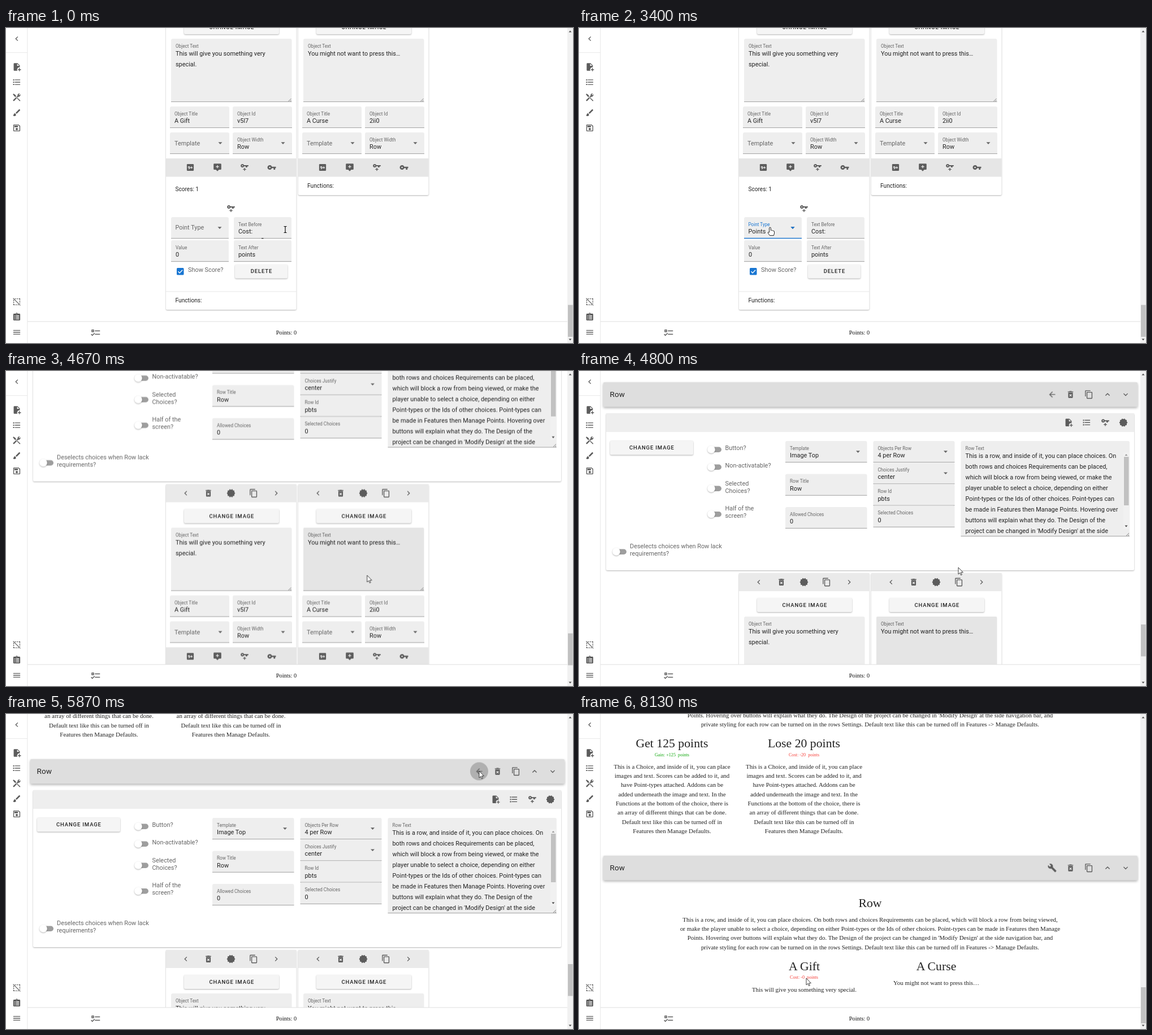
These frames come from a looping animation (1003x558 px, 8.99 s). An HTML page:

```html
<!DOCTYPE html>
<html lang="en">
<head>
<meta charset="utf-8">
<title>Choice editor</title>
<style>
@property --dy { syntax: '<number>'; inherits: true; initial-value: -416; }
html, body { margin: 0; width: 100%; height: 100%; overflow: hidden; background: #fff; }
svg { display: block; width: 1003px; height: 558px; font-family: Roboto, sans-serif; animation: scroll 8990ms linear infinite; }
text { white-space: pre; }
.serif { font-family: "Liberation Serif", "Times New Roman", serif; }
.card { filter: drop-shadow(0 1px 1px rgba(0,0,0,.3)); }
.bar { filter: drop-shadow(0 2px 2px rgba(0,0,0,.3)); }
.menu { filter: drop-shadow(0 2px 3px rgba(0,0,0,.35)); }
#page { transform: translateY(calc(var(--dy) * 1px)); }
#thumb { transform: translateY(calc(var(--dy) * -.1px)); }
.line { transform-box: fill-box; transform-origin: center; }
.edit, .view, .hover, .value, .beam, .hand, .arrow, .over, .ripple, .picked, .menu, .line, .label, .mark, .brush, #cursor {
  animation: 8990ms linear infinite;
}
.edit { animation-name: edit; animation-timing-function: step-end; }
.view { animation-name: view; animation-timing-function: step-end; }
.hover { animation-name: hover; }
.value { animation-name: value; animation-timing-function: step-end; }
.beam { animation-name: beam; animation-timing-function: step-end; }
.hand { animation-name: hand; animation-timing-function: step-end; }
.arrow { animation-name: arrow; animation-timing-function: step-end; }
.over { animation-name: over; }
.ripple { animation-name: ripple; transform-box: fill-box; transform-origin: center; }
.picked { animation-name: picked; }
.menu { animation-name: menu; }
.line { animation-name: line; }
.label { animation-name: label; }
.mark { animation-name: mark; }
.brush { animation-name: brush; }
#cursor { animation-name: move; animation-timing-function: ease-in-out; }

@keyframes scroll {
  0%, 48.93% { --dy: -416; }
  48.94%, 50.38% { --dy: -395; }
  50.39% { --dy: -330; }
  53.39%, 54.17% { --dy: 0; }
  58%, 65.95% { --dy: 60; }
  65.96%, 100% { --dy: 231; }
}
@keyframes move {
  0%, 10.34% { transform: translate(494px, 357px); }
  17.8% { transform: translate(359px, 356px); }
  20.02%, 29.7% { transform: translate(353px, 355px); }
  31.92%, 40.04% { transform: translate(338px, 353px); }
  48.16%, 50.39% { transform: translate(601px, 378px); }
  53.39%, 54.17% { transform: translate(671px, 348px); }
  60.07%, 60.85% { transform: translate(830px, 125px); }
  63.4%, 65.96% { transform: translate(837px, 101px); }
  70.41%, 71.19% { transform: translate(516px, 290px); }
  79.31%, 100% { transform: translate(402px, 468px); }
}
@keyframes edit { 0% { opacity: 1; } 65.95%, 100% { opacity: 0; } }
@keyframes view { 0% { opacity: 0; } 65.95%, 100% { opacity: 1; } }
@keyframes beam { 0% { opacity: 1; } 14.79% { opacity: 0; } 42.7% { opacity: 1; } 51%, 100% { opacity: 0; } }
@keyframes hand { 0% { opacity: 0; } 14.79% { opacity: 1; } 42.7%, 100% { opacity: 0; } }
@keyframes arrow { 0% { opacity: 0; } 51%, 100% { opacity: 1; } }
@keyframes hover { 0%, 14.79% { opacity: 0; } 17%, 21.1% { opacity: 1; } 22.5%, 100% { opacity: 0; } }
@keyframes value { 0% { opacity: 0; } 34.9%, 100% { opacity: 1; } }
@keyframes mark { 0%, .78% { opacity: 1; } 1.45%, 100% { opacity: 0; } }
@keyframes line { 0%, 21.1% { transform: scaleX(0); } 24.4%, 100% { transform: scaleX(1); } }
@keyframes label {
  0%, 21.1% { transform: translate(299.5px, 357.5px) scale(1.333); fill: #666; }
  23%, 100% { transform: translate(299.5px, 350.7px) scale(1); fill: #1976d2; }
}
@keyframes menu { 0%, 21.5% { opacity: 0; } 24.5%, 34.82% { opacity: 1; } 37.1%, 100% { opacity: 0; } }
@keyframes brush { 0%, 50.4% { opacity: 0; } 51.5%, 53.8% { opacity: 1; } 56%, 100% { opacity: 0; } }
@keyframes over { 0%, 62.4% { opacity: 0; } 63.4%, 65.95% { opacity: .1; } 65.96%, 100% { opacity: 0; } }
@keyframes ripple {
  0%, 64% { opacity: 0; transform: scale(.3); }
  65.2%, 65.95% { opacity: .12; transform: scale(1); }
  65.96%, 100% { opacity: 0; }
}
@keyframes picked { 0%, 82.31% { opacity: 0; } 84.5%, 89.77% { opacity: 1; } 90.43%, 100% { opacity: 0; } }
</style>
</head>
<body>
<svg id="stage" viewBox="0 0 1003 558"></svg>
<script>
const Z = 0.68, BODY = 16 * Z, SMALL = 12 * Z, INK = '#222', SOFT = '#666';

const icons = {
  left: 'M15.4 16.6L10.8 12L15.4 7.4L14 6L8 12L14 18Z',
  right: 'M8.6 16.6L13.2 12L8.6 7.4L10 6L16 12L10 18Z',
  up: 'M7.4 15.4L12 10.8L16.6 15.4L18 14L12 8L6 14Z',
  down: 'M7.4 8.6L12 13.2L16.6 8.6L18 10L12 16L6 10Z',
  back: 'M20 11V13H8L13.5 18.5L12.1 19.9L4.2 12L12.1 4.1L13.5 5.5L8 11Z',
  copy: 'M19 21H8V7H19M19 5H8A2 2 0 0 0 6 7V21A2 2 0 0 0 8 23H19A2 2 0 0 0 21 21V7A2 2 0 0 0 19 5M16 1H4A2 2 0 0 0 2 3V17H4V3H16Z',
  trash: 'M6 19A2 2 0 0 0 8 21H16A2 2 0 0 0 18 19V7H6ZM8.5 11.9L9.9 10.5L12 12.6L14.1 10.5L15.5 11.9L13.4 14L15.5 16.1L14.1 17.5L12 15.4L9.9 17.5L8.5 16.1L10.6 14ZM15.5 4L14.5 3H9.5L8.5 4H5V6H19V4Z',
  badge: 'M23 12L20.6 9.2L20.9 5.5L17.3 4.7L15.4 1.5L12 3L8.6 1.5L6.7 4.7L3.1 5.5L3.4 9.2L1 12L3.4 14.8L3.1 18.5L6.7 19.3L8.6 22.5L12 21L15.4 22.5L17.3 19.3L20.9 18.5L20.6 14.8Z',
  keyPlus: 'M6.5 3C8.5 3 10.1 4.3 10.7 6H22V9H19V12H15V9H10.7A4.5 4.5 0 1 1 6.5 3M6.5 6A1.5 1.5 0 0 0 6.5 9A1.5 1.5 0 0 0 6.5 6M8 16H11V13H13V16H16V18H13V21H11V18H8Z',
  key: 'M7 14A2 2 0 1 1 7 10A2 2 0 0 1 7 14M12.6 10A6 6 0 1 0 12.6 14H17V18H21V14H23V10Z',
  note: 'M4 2H20A2 2 0 0 1 22 4V16A2 2 0 0 1 20 18H16L12 22L8 18H4A2 2 0 0 1 2 16V4A2 2 0 0 1 4 2M11 6V9H8V11H11V14H13V11H16V9H13V6Z',
  box: 'M19 3H5A2 2 0 0 0 3 5V19A2 2 0 0 0 5 21H19A2 2 0 0 0 21 19V5A2 2 0 0 0 19 3Z',
  file: 'M14 2H6A2 2 0 0 0 4 4V20A2 2 0 0 0 6 22H13.8A6 6 0 0 1 20 13V8ZM13 9V3.5L18.5 9ZM18 15V18H15V20H18V23H20V20H23V18H20V15Z',
  list: 'M7 5H21V7H7ZM7 11H21V13H7ZM7 17H21V19H7ZM2.5 4.5H5.5V7.5H2.5ZM2.5 10.5H5.5V13.5H2.5ZM2.5 16.5H5.5V19.5H2.5Z',
  tools: 'M2 4L4 2L10 7L9.5 9L21.5 20L20 21.8L8.5 10L6.5 9.8ZM21.5 3.5L18.5 6.5L17 5.2L20 2A5 5 0 0 0 14 8L2 19.5L4.5 22L16 10A5 5 0 0 0 21.5 3.5Z',
  brush: 'M20.7 4.6L19.4 3.3C19 2.9 18.3 2.9 18 3.3L9 12.3L11.8 15L20.7 6C21.1 5.6 21.1 5 20.7 4.6M7 14A3 3 0 0 0 4 17C4 18.3 2.8 19 2 19C2.9 20.2 4.5 21 6 21A4 4 0 0 0 10 17A3 3 0 0 0 7 14Z',
  save: 'M17 3H5A2 2 0 0 0 3 5V19A2 2 0 0 0 5 21H19A2 2 0 0 0 21 19V7ZM19 19H5V5H16.2L19 7.8ZM12 12A3 3 0 1 0 12 18A3 3 0 0 0 12 12M6 6H15V10H6Z',
  deselect: 'M2 3.3L3.3 2L22 20.7L20.7 22ZM7 3H10V5H7ZM12 3H15V5H12ZM17 3H21V7H19V5H17ZM19 9H21V12H19ZM19 14H21V16H19ZM3 7H5V10H3ZM3 12H5V15H3ZM3 17H5V19H7V21H3ZM9 19H12V21H9ZM14 19H17V21H14Z',
  clipboard: 'M19 3H14.8A3 3 0 0 0 9.2 3H5A2 2 0 0 0 3 5V19A2 2 0 0 0 5 21H19A2 2 0 0 0 21 19V5A2 2 0 0 0 19 3M12 3A1 1 0 1 1 12 5A1 1 0 0 1 12 3M6 8H8V10H6ZM10 8H18V10H10ZM6 12H8V14H6ZM10 12H18V14H10ZM6 16H8V18H6ZM10 16H18V18H10Z',
  menu: 'M3 6H21V8H3ZM3 11H21V13H3ZM3 16H21V18H3Z',
  checks: 'M3 5H9V11H3ZM5 7V9H7V7ZM11 7H23V9H11ZM11 15H23V17H11ZM5 20L1.5 16.5L2.9 15.1L5 17.2L9.6 12.6L11 14Z',
  wrench: 'M22.7 19L13.6 9.9C14.5 7.6 14 4.9 12.1 3C10.1 1 7.1 .6 4.7 1.7L9 6L6 9L1.6 4.7C.4 7.1 .9 10.1 2.9 12.1C4.8 14 7.5 14.5 9.8 13.6L18.9 22.7C19.3 23.1 19.9 23.1 20.3 22.7L22.6 20.4C23.1 20 23.1 19.3 22.7 19Z'
};

const rect = (x, y, w, h, fill, more = '') =>
  `<rect x="${x}" y="${y}" width="${w}" height="${h}" fill="${fill}" ${more}/>`;
// y is the middle of the capitals
const text = (x, y, s, size = BODY, fill = INK, more = '') =>
  `<text x="${x}" y="${y + size * 0.33}" font-size="${size}" fill="${fill}" ${more}>${s}</text>`;
const mid = (x, y, s, size = BODY, fill = INK) => text(x, y, s, size, fill, 'text-anchor="middle"');
const icon = (name, x, y, k = Z) =>
  `<path transform="translate(${x - 12 * k} ${y - 12 * k}) scale(${k})" d="${icons[name]}" fill="#5c5c5c" fill-rule="evenodd"/>`;
const iconRow = (names, xs, y) => names.map((n, i) => icon(n, xs[i], y)).join('');
const group = (body, cls = '', shift = 0) => `<g class="${cls}" transform="translate(0 ${shift})">${body}</g>`;
const caret = (x, y, fill = '#666', more = '') => `<path d="M${x - 3.5} ${y - 1.7}h7l-3.5 3.6z" fill="${fill}" ${more}/>`;

function slab(x, y, w, h, fill = '#eee') {
  return `<path d="M${x} ${y + h}V${y + 3}q0-3 3-3h${w - 6}q3 0 3 3V${y + h}z" fill="${fill}"/>` +
    rect(x, y + h - 0.7, w, 0.8, '#8c8c8c');
}
function field(x, y, w, label, value, select) {
  const words = value === '' ? text(x + 8, y + 19, label, BODY, SOFT)
    : text(x + 8, y + 13, label, SMALL, SOFT) + text(x + 8, y + 25.7, value);
  return slab(x, y, w, 38) + words + (select ? caret(x + w - 16, y + 19) : '');
}
function area(x, y, w, h, label, lines) {
  const rx = x + w, by = y + h;
  return slab(x, y, w, h) + text(x + 8, y + 13, label, SMALL, SOFT) +
    lines.map((s, i) => text(x + 8, y + 26 + i * 19, s)).join('') +
    `<path d="M${rx - 6} ${by - 1}l5-5M${rx - 3} ${by - 1}l2-2" stroke="#666" stroke-width=".8"/>`;
}
function button(x, y, w, h, s) {
  return rect(x, y, w, h, '#f5f5f5', 'rx="2.5" class="card"') +
    text(x + w / 2 + 0.4, y + h / 2, s, 14 * Z, INK, 'text-anchor="middle" font-weight="500" letter-spacing=".85"');
}
function toggle(x, y, lines, labelX, labelY) {
  return rect(x, y - 4.5, 19, 9.5, '#9e9e9e', 'rx="4.7"') +
    `<circle class="card" cx="${x + 1}" cy="${y}" r="6.8" fill="#fff"/>` +
    lines.map((s, i) => text(labelX, labelY + i * 13.4, s, BODY, SOFT)).join('');
}

function card(dx, height, words, title, id, rest) {
  const s = n => n + dx;
  return rect(s(283), -58, 230.5, height, '#fff', 'class="card" rx="2"') +
    rect(s(283), -58, 230.5, 32, '#eaeaea') +
    iconRow(['left', 'trash', 'badge', 'copy', 'right'], [318, 358, 398, 438, 478].map(s), -42) +
    button(s(315), -14, 168, 25, 'CHANGE IMAGE') +
    area(s(292), 19, 213.5, 112, 'Object Text', words) +
    field(s(290), 139, 105, 'Object Title', title) +
    field(s(401), 139, 105, 'Object Id', id) +
    field(s(290), 185, 105, 'Template', '', true) +
    field(s(401), 185, 105, 'Object Width', 'Row', true) +
    rect(s(283), 231, 230.5, 32.5, '#e6e6e6') +
    iconRow(['box', 'note', 'keyPlus', 'key'], [326, 374, 422, 470].map(s), 247) +
    text(s(326), 247, '9+', 8, '#fff', 'text-anchor="middle" font-weight="700"') + rest;
}

const pointType = slab(292, 335, 102, 38) +
  `<g class="hover">${rect(292, 335, 102, 38, '#dfdfdf', 'rx="2"')}${rect(292, 372.2, 102, 1, '#222')}</g>` +
  `<text class="label" font-size="${SMALL}">Point Type</text>` +
  caret(378, 354) + caret(378, 354, '#1976d2', 'class="value"') +
  rect(292, 371.8, 102, 1.4, '#1976d2', 'class="line"') +
  `<g class="value">${text(299.5, 360.7, 'Points')}</g>`;

const scores = text(299.5, 285.5, 'Scores: 1', 10.1) + icon('keyPlus', 398, 320) + pointType +
  field(403, 335, 102, 'Text Before', 'Cost:') +
  rect(452, 372, 3.5, 1.2, '#222', 'class="mark"') +
  field(292, 376, 102, 'Value', '0') + field(403, 376, 102, 'Text After', 'points') +
  rect(302, 425, 12.5, 12.5, '#1976d2', 'rx="1.5"') +
  '<path d="M304.5 431.3l2.6 2.6 5-5.2" fill="none" stroke="#fff" stroke-width="1.4"/>' +
  text(322, 428.5, 'Show Score?', BODY, SOFT) + button(405, 419, 93, 24.5, 'DELETE') +
  rect(283, 466.5, 230.5, 0.8, '#e0e0e0') + text(299.5, 483, 'Functions:', 10.2);

const popup = `<g class="menu">${rect(292, 338, 102, 49, '#fff', 'rx="2.5"')}${rect(292, 344, 102, 37, '#f3f3f3')}${text(303, 363, 'Points')}</g>`;

const rowLines = ['This is a row, and inside of it, you can place choices. On', 'both rows and choices Requirements can be placed,',
  'which will block a row from being viewed, or make the', 'player unable to select a choice, depending on either',
  'Point-types or the Ids of other choices. Point-types can', 'be made in Features then Manage Points. Hovering over',
  'buttons will explain what they do. The Design of the', "project can be changed in 'Modify Design' at the side"];

const rowPanel = rect(48, 75, 934, 278, '#fff', 'class="card" rx="2"') + rect(48, 75, 934, 33, '#eee') +
  iconRow(['file', 'list', 'keyPlus', 'badge'], [866, 898, 931, 963], 91.3) +
  button(55, 123.5, 147, 25, 'CHANGE IMAGE') +
  toggle(233, 139, ['Button?'], 258.5, 136) +
  toggle(233, 170, ['Non-activatable?'], 258.5, 167) +
  toggle(233, 208, ['Selected', 'Choices?'], 258.5, 199) +
  toggle(233, 253.5, ['Half of the', 'screen?'], 258.5, 243.5) +
  toggle(65, 320, ['Deselects choices when Row lack', 'requirements?'], 90, 310) +
  field(365, 124, 144.5, 'Template', 'Image Top', true) +
  field(365, 182.5, 144.5, 'Row Title', 'Row') + field(365, 241, 144.5, 'Allowed Choices', '0') +
  field(520.5, 124, 144, 'Objects Per Row', '4 per Row', true) +
  field(520.5, 162.2, 144, 'Choices Justify', 'center', true) +
  field(520.5, 200.4, 144, 'Row Id', 'pbts') + field(520.5, 238.6, 144, 'Selected Choices', '0') +
  area(675.5, 124, 298.5, 169, 'Row Text', rowLines) +
  rect(963, 144, 10, 136, '#f1f1f1') + rect(964, 152, 8.5, 86, '#c1c1c1') +
  '<path d="M965.5 150h5l-2.5-3z" fill="#999"/><path d="M965.5 273.5h5l-2.5 3z" fill="#444"/>';

const brushed = rect(526, 19, 213.5, 112, '#000', 'fill-opacity=".035"');
const editor = group(rowPanel + group(
  card(0, 557, ['This will give you something very', 'special.'], 'A Gift', 'v5l7', scores) +
  card(234, 354, ['You might not want to press this…'], 'A Curse', '2ii0', text(533, 280, 'Functions:', 10.2)) +
  `<g class="brush">${brushed}</g>` + popup, '', 416), 'edit');

const intro = ['This is a row, and inside of it, you can place choices. On both rows and choices Requirements can be placed, which will block a row from being viewed,',
  'or make the player unable to select a choice, depending on either Point-types or the Ids of other choices. Point-types can be made in Features then Manage',
  "Points. Hovering over buttons will explain what they do. The Design of the project can be changed in 'Modify Design' at the side navigation bar, and",
  'private styling for each row can be turned on in the rows Settings. Default text like this can be turned off in Features -&gt; Manage Defaults.'];
const about = ['This is a Choice, and inside of it, you can place', 'images and text. Scores can be added to it, and',
  'have Point-types attached. Addons can be', 'added underneath the image and text. In the', 'Functions at the bottom of the choice, there is',
  'an array of different things that can be done.', 'Default text like this can be turned off in', 'Features then Manage Defaults.'];
const lines = (x, y, list) => list.map((s, i) => mid(x, y + i * 16.32, s)).join('');
const heading = (x, y, s) => mid(x, y, s, 32 * Z);
const RED = '#f5403a', GREEN = '#12a80f', GAP = '\u00a0\u00a0';

const upper = group(lines(515, -30.5, intro) +
  heading(164.5, 52, 'Get 125 points') + mid(164.5, 72, `Gain: +125${GAP}points`, SMALL, GREEN) + lines(164.5, 93, about) +
  heading(398, 52, 'Lose 20 points') + mid(398, 72, `Cost: -20${GAP}points`, SMALL, RED) + lines(398, 93, about), 'serif', -231);

const result = group(rect(288, 434, 221, 68, '#70ff7e', 'class="picked"') +
  heading(515, 335, 'Row') + lines(515, 364, intro) +
  heading(398.5, 446.5, 'A Gift') + mid(398, 466.5, `Cost: -0${GAP}points`, SMALL, RED) +
  mid(398.5, 488, 'This will give you something very special.') +
  heading(632, 446.5, 'A Curse') + mid(632, 476, 'You might not want to press this…'), 'serif', -231);

const header = rect(43, 20, 945, 43.5, '#dedede', 'class="bar" rx="2"') + text(54.5, 41.7, 'Row', 20 * Z) +
  '<g transform="translate(837 41.5)"><circle class="over" r="16"/><circle class="ripple" r="16"/></g>' +
  `<g class="edit">${icon('back', 837, 41.7)}</g><g class="view">${icon('wrench', 837, 41.7)}</g>` +
  iconRow(['trash', 'copy', 'up', 'down'], [869.5, 902, 935, 967], 41.7);

const sidebar = rect(0, 0, 38, 558, '#fff') + rect(37.5, 0, 0.8, 558, '#e0e0e0') + rect(0, 43, 38, 0.8, '#e4e4e4') +
  [['left', 19], ['file', 69], ['list', 96], ['tools', 123], ['brush', 150], ['save', 177], ['deselect', 485], ['clipboard', 512], ['menu', 539]]
    .map(([n, y]) => icon(n, 19, y)).join('');

const footer = rect(38, 520, 955, 38, '#fff') + rect(38, 519.5, 955, 0.9, '#dcdcdc') + icon('checks', 158, 539.5, 0.75) +
  `<g class="serif">${mid(496, 539.7, 'Points: 0', 10.3, '#111')}</g>`;

const scrollbar = rect(993, 0, 10, 558, '#f1f1f1') +
  `<g class="edit"><g id="thumb">${rect(994, 449, 8.5, 56.5, '#c1c1c1')}</g></g>` +
  `<g class="view">${rect(994, 484, 8.5, 64, '#c1c1c1')}</g>` +
  '<path d="M995.5 7.5h5l-2.5-3zM995.5 550.5h5l-2.5 3z" fill="#505050"/>';

const cursor = `<g id="cursor" stroke-linejoin="round">
  <path class="beam" d="M-2.5-5.5H-.8L0-4.8L.8-5.5H2.5M0-4.8V4.8M-2.5 5.5H-.8L0 4.8L.8 5.5H2.5" fill="none" stroke="#111" stroke-width="1.2"/>
  <path class="hand" d="M-1.4.8Q0-.6 1.3.8V5.4Q2.6 4.6 3.4 5.8Q4.8 5.1 5.6 6.4Q7.5 6 7.5 8V11L6.4 14.6H-.6L-3.8 9.8Q-4 7.8-1.4 9Z" fill="#fff" stroke="#111" stroke-width=".9"/>
  <path class="arrow" d="M0 0V12L2.8 9.5L4.6 13.6L6.4 12.8L4.6 8.8H8.4Z" fill="#fff" stroke="#111" stroke-width=".8"/>
</g>`;

document.getElementById('stage').innerHTML =
  `<g id="page">${upper}${editor}<g class="view">${result}</g>${header}</g>` + footer + sidebar + scrollbar + cursor;
</script>
</body>
</html>
```
